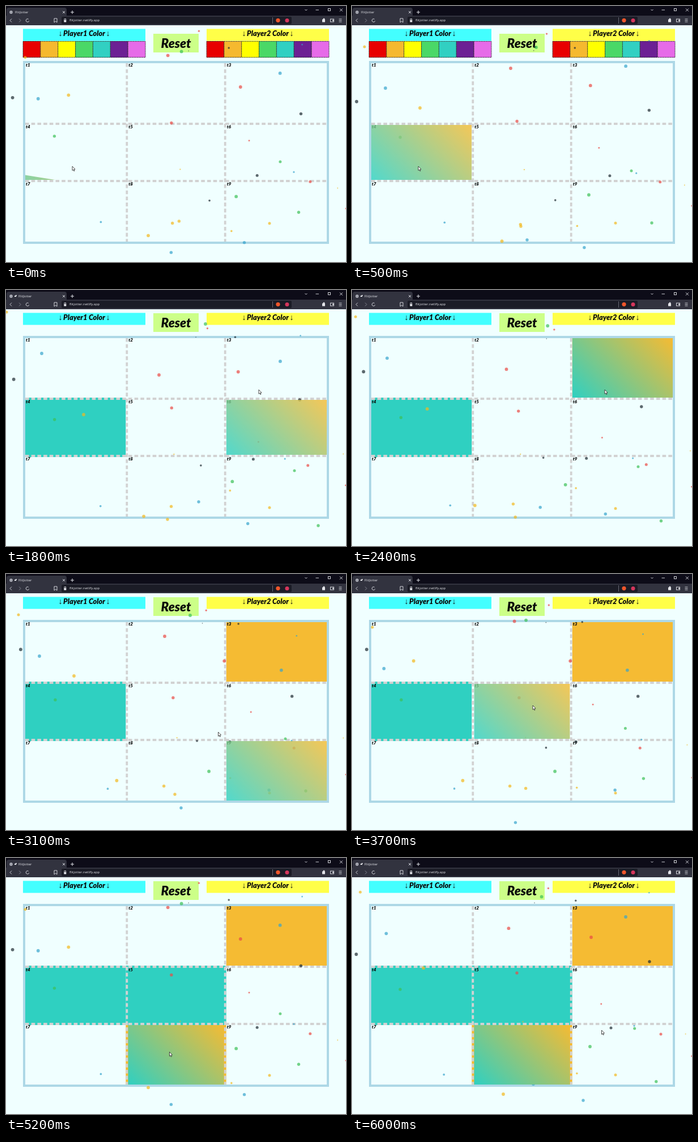
These frames come from a looping animation (600x452 px, 6100 ms). An HTML page with a canvas:

```html
<!DOCTYPE html>
<html lang="en">
<head>
<meta charset="utf-8">
<title>FlitJotter</title>
<style>
  html, body { margin: 0; width: 100%; height: 100%; overflow: hidden; background: #f0ffff; }
  canvas { display: block; }
</style>
</head>
<body>
<canvas id="stage" width="600" height="452"></canvas>
<script>
const ctx = document.getElementById('stage').getContext('2d');
const LOOP = 6100, STEP = 100, SLIDE = 400, LAG = 80, PERIOD = 5.2;
const TEAL = '#2fd0c1', ORANGE = '#f5bb33', INK = '#0b0b0b';
const BLUE = '#36a4cc', DARK = '#1d2a30', GOLD = '#f2b81c', GREEN = '#3cc157', RED = '#ea4a45';
const DISPLAY = 'Lato, sans-serif', UI = '"Open Sans", sans-serif';
const SWATCHES = ['#e80000', '#f5b92f', '#ffff00', '#4ad867', '#31d0c2', '#6c2094', '#e66be8'];
const CELL_W = 532 / 3, CELL_H = 105, BOARD_TOP = 81;

// Where the pointer rests: arrival time, departure time, x, y
const rests = [
  [0, 900, 117, 283], [1000, 1000, 171, 363], [1300, 1600, 425, 235],
  [1800, 2400, 446, 176], [2600, 2900, 420, 330], [3100, 3100, 374.5, 279],
  [3400, 4200, 319, 232], [4400, 5850, 288.5, 342.5], [6000, LOOP, 440.5, 304]
];

const clamp = v => Math.min(1, Math.max(0, v));
const ease = v => (1 - Math.cos(Math.PI * clamp(v) ** .6)) / 2;
const random = n => Math.abs(Math.sin(n * 12.9898) * 43758.5453) % 1;

function pointerAt(t) {
  const i = rests.findLastIndex(r => t >= r[0]);
  const [, leave, x, y] = rests[i], [arrive, , nx, ny] = rests[i + 1] || [LOOP + 1, 0, x, y];
  const k = clamp((t - leave) / (arrive - leave)), s = k * k * (3 - 2 * k);
  return [x + (nx - x) * s, y + (ny - y) * s];
}

function tileAt(t) {
  const [x, y] = pointerAt(t);
  return Math.floor((x - 34) / CELL_W) + 3 * Math.floor((y - BOARD_TOP - 4) / CELL_H);
}

// Each stay of the pointer over one tile
const hovers = [{ tile: tileAt(0), enter: -20 }];
for (let t = 0; t < LOOP; t += 10) {
  const last = hovers.at(-1), tile = tileAt(t);
  if (tile === last.tile) continue;
  last.leave = t + LAG;
  hovers.push({ tile, enter: t + LAG, leave: LOOP });
}
// The two players take turns
const clicks = [600, 2200, 4000, 5200].map((time, i) => ({
  time, tile: tileAt(time), color: i % 2 ? ORANGE : TEAL
}));

// Dots swing around a middle: x, y, then the reach on each axis.
// They form two flocks that reach their far ends at different seconds.
const flocks = [
  { peak: 3.4, dots: {
    [DARK]: [[17, 151, 9.5, -19], [514.5, 200, -10.5, 17], [425, 298, -32, -2]],
    [BLUE]: [[484.5, 138, 1.5, 34], [437, 404, 29, -24]],
    [GOLD]: [[230, 390, -37, -27], [288, 380, -10, -6], [465, 385, 0, 2]],
    [GREEN]: [[388, 341, -32, 8], [86, 227, 1, -5]],
    [RED]: [[403, 147, -19, 7], [293, 211, 2, 8], [526, 309, -19, -2]]
  } },
  { peak: 1.8, dots: {
    [BLUE]: [[59, 145, 4, -33], [309, 413, 31, -39]],
    [GOLD]: [[120, 180, 17, 40], [298, 389, -13, 16], [22, 72, -21, -33]],
    [GREEN]: [[325, 73, 27, -13], [529, 383, 22, 33], [493, 291, 16, 28]],
    [RED]: [[280, 110, -10, 40]]
  } }
];

function rect(color, x, y, w, h) {
  ctx.fillStyle = color;
  ctx.fillRect(x, y, w, h);
}

function disc(color, x, y, r) {
  ctx.fillStyle = color;
  ctx.beginPath();
  ctx.arc(x, y, r, 0, 7);
  ctx.fill();
}

function line(color, width, ...points) {
  ctx.strokeStyle = color;
  ctx.lineWidth = width;
  ctx.beginPath();
  for (let i = 0; i < points.length; i += 2) ctx.lineTo(points[i], points[i + 1]);
  ctx.stroke();
}

function box(color, x, y, w, h, width = .9) {
  ctx.strokeStyle = color;
  ctx.lineWidth = width;
  ctx.strokeRect(x, y, w, h);
}

function cross(color, x, y, r) {
  line(color, .9, x - r, y - r, x + r, y + r);
  line(color, .9, x + r, y - r, x - r, y + r);
}

function text(str, x, y, font, color = INK, align = 'left') {
  ctx.font = font;
  ctx.fillStyle = color;
  ctx.textAlign = align;
  ctx.textBaseline = 'middle';
  ctx.fillText(str, x, y);
}

function pill(color, x, y, w, h, radius) {
  ctx.fillStyle = color;
  ctx.beginPath();
  ctx.roundRect(x, y, w, h, radius);
  ctx.fill();
}

function drawBrowser(playing) {
  const light = '#e4e5ea', dim = '#8b8d98', bar = '#32333f';
  rect('#0d0c18', 0, 0, 600, 17);
  pill(bar, 1, 3, 106, 18, [4, 4, 0, 0]);
  rect(bar, 0, 17, 600, 17);

  disc('#b9bbc4', 9, 11, 2.8);
  line('#555764', .7, 6.5, 11, 11.5, 11);
  if (playing) line(light, 2, 15, 11, 17, 11, 18.5, 9);
  text('FlitJotter', playing ? 22 : 16, 11, '6px ' + UI, light);
  cross(light, 102, 11, 2);
  line(light, 1, 114, 11, 120, 11);
  line(light, 1, 117, 8, 117, 14);

  line(light, .9, 527.5, 6, 529.5, 8, 531.5, 6);
  line(light, .9, 546.5, 7, 552, 7);
  box(light, 568.5, 4.5, 4, 4);
  cross(light, 591.5, 7, 2.5);

  line(light, .9, 10, 22.5, 7, 25.5, 10, 28.5);
  line(dim, .9, 23, 22.5, 26, 25.5, 23, 28.5);
  ctx.strokeStyle = light;
  ctx.beginPath();
  ctx.arc(38, 25.5, 2.8, .3, 5.4);
  ctx.stroke();
  line(light, .9, 85, 22, 90, 22, 90, 29, 87.5, 27, 85, 29, 85, 22);
  pill('#1b1c26', 98, 19, 406, 13, 2);
  rect(light, 102.3, 25, 4, 3.5);
  box(light, 103, 22.8, 2.6, 3);
  text('flitjotter.netlify.app', 112, 25.5, '6px ' + UI, light);
  line(dim, .7, 470.5, 20, 470.5, 31);
  disc('#f0562b', 480, 25.3, 3.6);
  disc('#d5365c', 496, 25.5, 3.5);
  rect(light, 558, 23.5, 5, 5);
  disc(light, 561, 23, 1.5);
  box(light, 572.5, 23, 6, 5);
  rect(light, 576, 24.5, 3, 2);
  for (const y of [23, 25.5, 28]) line(light, .8, 587.5, y, 592.5, y);
}

function drawPlayer(n, x, color, showPalette) {
  rect(color, x, 40.4, 216, 21.2);
  text(`Player${n} Color`, x + 108, 49, 'italic 900 12.8px ' + DISPLAY, INK, 'center');
  for (const dx of [66, 150]) text('↓', x + dx, 49, '14px "Liberation Serif", serif', INK, 'center');
  if (!showPalette) return;
  const w = 216 / SWATCHES.length;
  SWATCHES.forEach((swatch, i) => {
    rect(swatch, x + i * w, 62, w, 29);
    ctx.setLineDash([2, 1]);
    box('#222', x + i * w, 62.4, w, 28.2);
    ctx.setLineDash([]);
  });
}

// Outer cell box and the part inside its dashed borders
function cell(tile, top) {
  const col = tile % 3, row = Math.floor(tile / 3);
  const x = 34 + col * CELL_W, y = top + 4 + row * CELL_H;
  const ix = col === 1 ? 4 : 0, iy = row === 1 ? 4 : 0;
  return { x, y, inner: { x: x + ix, y: y + iy, w: CELL_W - 2 * ix, h: CELL_H - 2 * iy } };
}

function drawBoard(t, top) {
  box('#add8e6', 32, top + 2, 536, 319, 4);
  for (const { time, tile, color } of clicks) {
    const { x, y } = cell(tile, top);
    if (t >= time) rect(color, x, y, CELL_W, CELL_H);
  }
  ctx.setLineDash([6.6, 4.1]);
  for (const y of [111, 212]) line('#d2d2d2', 3.8, 34, top + y, 566, top + y);
  for (const x of [213.3, 386.7]) line('#d2d2d2', 3.8, x, top + 4, x, top + 319);
  ctx.setLineDash([]);
  for (let tile = 0; tile < 9; tile++) {
    const { x, y } = cell(tile, top).inner;
    text('t' + (tile + 1), x + 1, y + 4, 'italic 900 8px ' + DISPLAY);
  }
}

function drawDots(seconds) {
  ctx.globalAlpha = .7;
  for (const { peak, dots } of flocks) {
    const swing = Math.cos(2 * Math.PI * (seconds - peak) / PERIOD);
    for (const color in dots) {
      dots[color].forEach(([x, y, dx, dy], i) => disc(color, x + dx * swing, y + dy * swing, 2.9 - i * .2));
    }
  }
  // Scattered small specks
  const colors = [BLUE, DARK, GOLD, RED];
  for (let i = 1; i <= 12; i++) {
    const swing = Math.cos(2 * Math.PI * (seconds / PERIOD + random(i)));
    const x = 600 * random(i + 20) + 30 * swing * (random(i + 40) - .5);
    const y = 50 + 400 * random(i + 60) + 60 * swing * (random(i + 80) - .5);
    disc(colors[i % 4], x, y, .7 + 1.2 * random(i + 100));
  }
  ctx.globalAlpha = 1;
}

// A slanted gradient sheet rises over the hovered tile and sinks on leaving
function drawHover(t, top, { tile, enter, leave }) {
  const amount = ease((t - enter) / SLIDE) - ease((t - leave) / SLIDE);
  if (amount <= 0) return;
  const { x, y, w, h } = cell(tile, top).inner;
  const slant = w * .16, edge = y + h - amount * (h + slant + 2);
  const cx = x + w / 2, cy = y + h / 2 + (1 - amount) * h, q = (w + h) / 4;
  const fill = ctx.createLinearGradient(cx - q, cy + q, cx + q, cy - q);
  fill.addColorStop(0, TEAL);
  fill.addColorStop(1, ORANGE);
  ctx.save();
  ctx.beginPath();
  ctx.rect(x, y, w, h);
  ctx.clip();
  const taken = clicks.some(c => c.tile === tile && t >= c.time);
  ctx.globalAlpha = taken ? 1 : .82;
  ctx.fillStyle = fill;
  ctx.beginPath();
  ctx.moveTo(x, edge);
  ctx.lineTo(x + w, edge + slant);
  ctx.lineTo(x + w, y + h + slant);
  ctx.lineTo(x, y + h + slant);
  ctx.fill();
  ctx.restore();
}

function drawPointer(t) {
  const arrow = new Path2D('M0 0V7.4L1.7 6 2.9 8.5 4 8 2.9 5.5 5 5.2Z');
  ctx.save();
  ctx.translate(...pointerAt(t));
  ctx.fillStyle = '#fff';
  ctx.fill(arrow);
  ctx.strokeStyle = '#222';
  ctx.lineWidth = .8;
  ctx.stroke(arrow);
  ctx.restore();
}

function draw(now) {
  const t = Math.floor(now % LOOP / STEP) * STEP;
  const started = t >= clicks[0].time, top = started ? BOARD_TOP : 97;
  const buttonY = started ? 41 : 49;
  rect('#f0ffff', 0, 0, 600, 452);
  drawPlayer(1, 30, '#43ffff', !started);
  drawPlayer(2, 354, '#ffff48', !started);
  rect('#ccff88', 260, buttonY, 80, 33);
  text('Reset', 300, buttonY + 18.5, 'italic 900 22.5px ' + DISPLAY, INK, 'center');
  drawBoard(t, top);
  drawDots(t / 1000);
  for (const hover of hovers) drawHover(t, top, hover);
  drawBrowser(started);
  drawPointer(t);
  requestAnimationFrame(draw);
}
requestAnimationFrame(draw);
</script>
</body>
</html>
```
